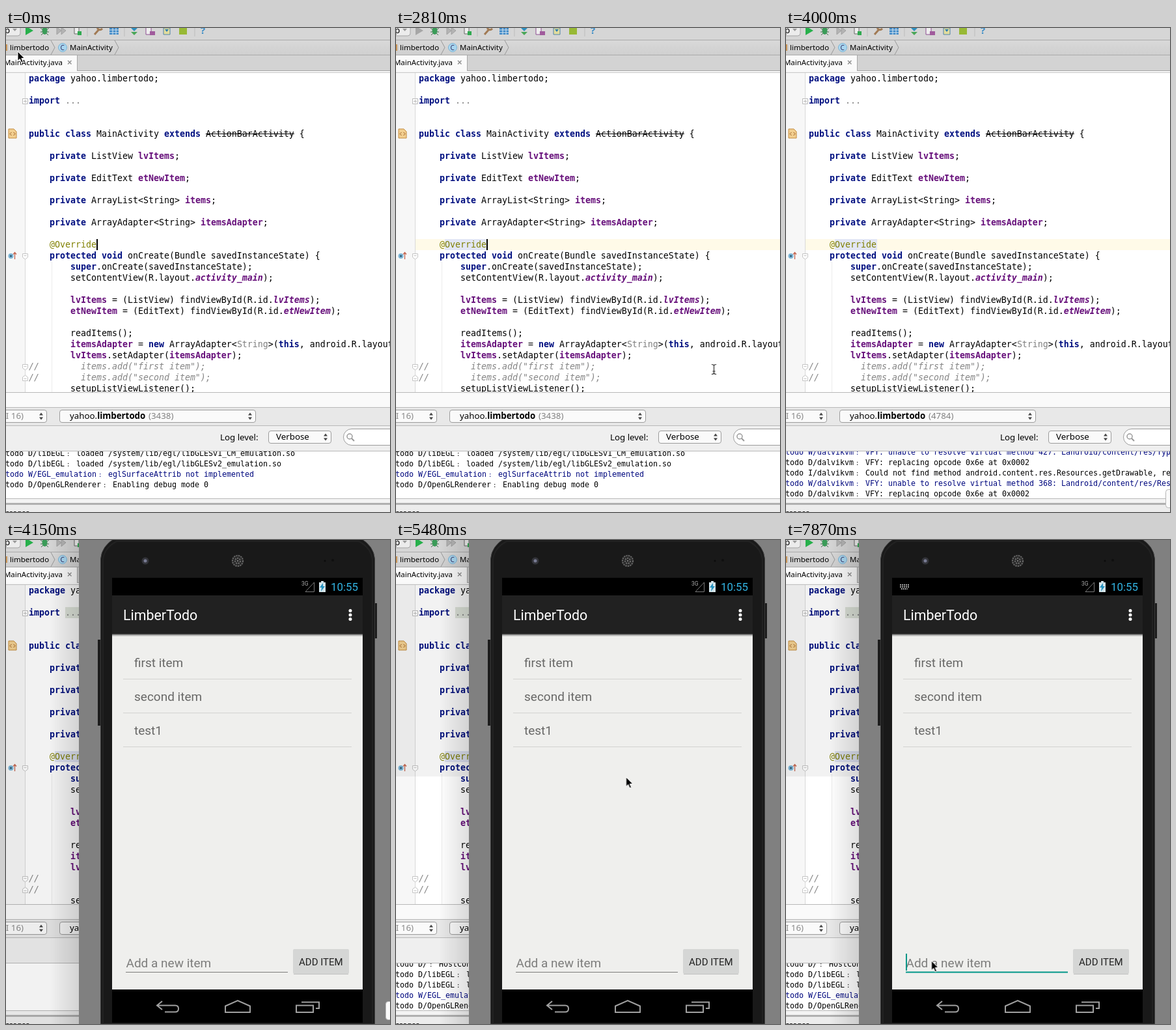
An HTML page for the animation above (8 s loop, 590 by 743 pixels).

```html
<!DOCTYPE html>
<html lang="en">
<head>
<meta charset="utf-8">
<title>Editor and emulator</title>
<style>
html, body { margin: 0; width: 100%; height: 100%; overflow: hidden; }
#stage { position: relative; width: 590px; height: 743px; overflow: hidden; background: #ececec; }
#stage > * { position: absolute; left: 0; top: 0; }
svg { display: block; font: 13.3px "Noto Sans", sans-serif; }
.small { font-size: 11.5px; }
.app { font-family: Roboto, sans-serif; font-size: 19px; }

#stage > .code { left: 35px; top: 69px; width: 555px; height: 490px; margin: 0; overflow: hidden;
  font: 13.29px/17px "DejaVu Sans Mono", monospace; color: #000; }
.code b { color: #000f80; }
.code em { color: #660e7a; font-weight: bold; font-style: normal; }
.code em.static { font-style: italic; }
.code i { color: #858585; }
.code q { color: #808080; }
.code u { color: #808000; text-decoration: none; }
q::before, q::after { content: none; }

#stage > .log { top: 650px; width: 590px; height: 71px; overflow: hidden;
  font: 11.63px/15px "DejaVu Sans Mono", monospace; white-space: pre; color: #000; }
.log p { margin: 0 0 0 -1px; }
.log div { position: absolute; top: -6px; left: 0; }
.log div.old { top: -4px; }
.log q { display: inline-block; width: 18px; font-size: 9px; text-indent: 3px; }
.log .warn { color: #00087f; }

/* every change is a hard cut inside one 8 s loop */
.old, .fresh, .late, .line, .word, .import, .idle, .busy, .caret, .tip, .phone, .dim,
.focus, .blur, .arrow, .beam { animation: 8s step-end infinite; }
.old { animation-name: old; }
.fresh { animation-name: fresh; }
.late { animation-name: late; }
.line { animation-name: line; }
.word { animation-name: word; }
.import { animation-name: import; }
.idle { animation-name: idle; }
.busy { animation-name: busy; }
.caret { animation-name: caret; }
.tip { animation-name: tip; }
.phone { animation-name: phone; }
.dim { animation-name: dim; }
.focus { animation-name: focus; }
.blur { animation-name: blur; }
.arrow { animation-name: arrow; }
.beam { animation-name: beam; }
@keyframes old { 0% { opacity: 1 } 44.375%, 100% { opacity: 0 } }
@keyframes fresh { 0% { opacity: 0 } 44.375% { opacity: 1 } 51.875%, 100% { opacity: 0 } }
@keyframes late { 0% { opacity: 0 } 64.75%, 100% { opacity: 1 } }
@keyframes line { 0% { opacity: 0 } 14.75% { opacity: 1 } 51.875%, 100% { opacity: 0 } }
@keyframes word { 0% { opacity: 0 } 14.75%, 100% { opacity: 1 } }
@keyframes import { 0% { fill: #fff } 14.75% { fill: #fdf4dc } 22% { fill: #fff } 51.875%, 100% { fill: #e2e8de } }
@keyframes idle { 0% { opacity: 1 } 20.25% { opacity: 0 } 46.25%, 100% { opacity: 1 } }
@keyframes busy { 0% { opacity: 0 } 20.25% { opacity: 1 } 46.25%, 100% { opacity: 0 } }
@keyframes caret {
  0% { opacity: 1 } 7.375% { opacity: 0 } 12.875% { opacity: 1 } 20.25% { opacity: 0 }
  25.75% { opacity: 1 } 31.375% { opacity: 0 } 35.125% { opacity: 1 } 40.75% { opacity: 0 }
  46.25% { opacity: 1 } 50%, 100% { opacity: 0 }
}
@keyframes tip { 0% { opacity: 0 } 48.125% { opacity: 1 } 57.375%, 100% { opacity: 0 } }
@keyframes phone { 0% { opacity: 0 } 51.875%, 100% { opacity: 1 } }
@keyframes dim { 0% { opacity: 0 } 51.875% { opacity: 1 } 64.75%, 100% { opacity: 0 } }
@keyframes focus { 0% { opacity: 0 } 94.75%, 100% { opacity: 1 } }
@keyframes blur { 0% { opacity: 1 } 94.75%, 100% { opacity: 0 } }
@keyframes arrow {
  0% { transform: translate(18px, 36px) }
  1.75% { transform: translate(16px, 31px) }
  3.625% { transform: translate(18px, 22px) }
  5.5% { transform: translate(27px, 11px) }
  7.375% { transform: translate(35px, 4px) }
  9.25% { transform: translate(39px, 2px) }
  22% { transform: translate(70px, 40px) }
  23.875% { transform: translate(-50px, 0) }
  40.75% { transform: translate(535px, 640px) }
  42.5% { transform: translate(560px, 715px) }
  44.375% { transform: translate(-50px, 0) }
  66.625% { transform: translate(376px, 478px) }
  68.5% { transform: translate(353.5px, 364px) }
  72.25% { transform: translate(346px, 395px) }
  74.125% { transform: translate(334px, 420px) }
  77.875% { transform: translate(350px, 400px) }
  79.75% { transform: translate(374px, 368px) }
  83.5% { transform: translate(270px, 559px) }
  87.25% { transform: translate(248px, 605px) }
  89.125% { transform: translate(230px, 636px) }
  92.875%, 100% { transform: translate(223.5px, 646px) }
}
@keyframes beam {
  0% { transform: translate(-50px, 0) }
  23.875% { transform: translate(150px, 150px) }
  25.75% { transform: translate(270px, 304px) }
  27.625% { transform: translate(320px, 370px) }
  29.5% { transform: translate(365px, 420px) }
  31.375% { transform: translate(408px, 464px) }
  35.125% { transform: translate(488.5px, 524px) }
  38.875% { transform: translate(510px, 555px) }
  40.75%, 100% { transform: translate(-50px, 0) }
}
</style>
</head>
<body>
<div id="stage">

<svg width="590" height="743">
  <defs>
    <linearGradient id="bar" x2="0" y2="1"><stop stop-color="#d9d9d9"/><stop offset="1" stop-color="#cfcfcf"/></linearGradient>
    <linearGradient id="shade"><stop stop-opacity="0"/><stop offset="1" stop-opacity=".13"/></linearGradient>
    <path id="updown" d="M-3-1.5L0-5.5 3-1.5ZM-3 1.5L0 5.5 3 1.5Z" fill="#444"/>
    <path id="play" d="M30-3L42 4 30 11Z"/>
    <path id="fold" d="M-4-4H4V1.500L0 4.500-4 1.500ZM-2-1H2" fill="#fff" stroke="#c4c4c4"/>
  </defs>

  <!-- toolbar -->
  <rect width="590" height="18" fill="#d6d6d6"/>
  <rect x="-8" y="-8" width="30" height="20" rx="4" fill="#ececec" stroke="#a5a5a5"/>
  <text x="-2" y="8">p</text>
  <path d="M10 1h7l-3.500 4Z" fill="#999"/>
  <use href="#play" class="idle" fill="#27b04b"/>
  <use href="#play" class="busy" fill="#a6a6a6"/>
  <path d="M53 0l4 3M66 0l-4 3M53 6h13M54 11l4-4M65 11l-4-4" stroke="#476b4c"/>
  <ellipse cx="59.500" cy="4" rx="4" ry="6" fill="#3b9b58"/>
  <path d="M78-1l7 5-7 6ZM85-1l7 5-7 6Z" fill="#b4b4b4" stroke="#a0a0a0"/>
  <path d="M105-1h7V9h-7Z" fill="#eee" stroke="#666"/>
  <path d="M110 5h6v6h-6Z" fill="#31a951"/>
  <path d="M125 0V13M182 0V13M290 0V13" stroke="#bbb"/>
  <path d="M136 10l7-8M140 0q4 5 8 1" fill="none" stroke="#a27b55" stroke-width="3"/>
  <path d="M159 0h14v10h-14Z" fill="#3f88c5"/>
  <path d="M159 3h14M159 7h14M164 0V10M169 0V10" stroke="#d8e7f3"/>
  <path d="M192 0h10l-5 5Z" fill="#2b8fc0"/>
  <path d="M192 6h10l-5 5Z" fill="#4aa657"/>
  <path d="M215-1h8V10h-8Z" fill="#eee" stroke="#8d4d91"/>
  <path d="M221 5h8v6h-8Z" fill="#a05b9c"/>
  <path d="M242 0h10v10h-10Z" fill="#e2dc9d" stroke="#4f83a8"/>
  <path d="M244 2h6l-3 4Z" fill="#2f7eb3"/>
  <rect x="266" y="-1" width="12" height="11" fill="#98b935"/>
  <text x="299" y="9" font-size="15" font-weight="bold" fill="#378bc6">?</text>

  <!-- breadcrumbs and tab -->
  <rect y="18" width="590" height="24" fill="url(#bar)"/>
  <path d="M0 18.500H590M0 41.500H590" stroke="#aaa"/>
  <path d="M69 19L75 30 69 41M167 19L173 30 167 41" fill="none" stroke="#989898"/>
  <rect y="25" width="2" height="10" fill="#c99456"/>
  <g class="small">
    <text x="6" y="34">limbertodo</text>
    <circle cx="87" cy="30" r="6.500" fill="#a8d5ef" stroke="#7eb4d4"/>
    <text x="83.500" y="34" font-size="10" fill="#336">C</text>
    <text x="98" y="34">MainActivity</text>
    <rect y="42" width="590" height="25" fill="#d3d3d3"/>
    <path d="M0 42H109V67H0Z" fill="#fafafa"/>
    <path d="M109.500 42V66M109 65.500H590" stroke="#a6a6a6"/>
    <rect y="66" width="590" height="2" fill="#f6f6f6"/>
    <text x="87" y="57" text-anchor="end">MainActivity.java</text>
  </g>
  <path d="M95 50l5.500 5.500M100.500 50l-5.500 5.500" stroke="#888" stroke-width="1.300"/>

  <!-- editor -->
  <path d="M0 68H590V559H0Z" fill="#fff"/>
  <path d="M0 68H29V559H0Z" fill="#f7f7f7"/>
  <path d="M29.500 68V559" stroke="#d9d9d9"/>
  <path d="M0 68.500H590" stroke="#c9c9c9"/>
  <path d="M70.500 359V559" stroke="#ececec"/>
  <rect class="line" x="30" y="324" width="560" height="17" fill="#fffae8"/>
  <rect class="word" x="75" y="324" width="65" height="17" fill="#e2e6f5"/>
  <rect class="import" x="91" y="103" width="24" height="17"/>
  <path d="M4 155h8l4 4v10H4Z" fill="#f2cf91" stroke="#c28a3c"/>
  <path d="M8.500 160l-2.500 2.500 2.500 2.500M11.500 160l2.500 2.500-2.500 2.500" fill="none" stroke="#9c5a1e"/>
  <circle cx="7.500" cy="350" r="4" fill="#7db6d6"/><circle cx="7.500" cy="350" r="1.500" fill="#28526b"/>
  <path d="M13.500 355V345M11 347.500l2.500-3 2.500 3" fill="none" stroke="#c3654f" stroke-width="1.300"/>
  <path d="M25.500 108.500h8v8h-8ZM27 112.500h5M29.500 110v5" fill="#fff" stroke="#bbb"/>
  <use href="#fold" x="29.500" y="350.500"/>
  <use href="#fold" x="29.500" y="520.500"/>
  <use href="#fold" transform="translate(29.500 537.500) scale(1 -1)"/>

  <!-- tool window -->
  <path d="M0 560H590V583H0Z" fill="#fafafa"/>
  <path d="M0 583H590V610H0Z" fill="#e8e8e8"/>
  <path d="M0 611H590V650H0Z" fill="#efefef"/>
  <path d="M0 650H590V731H0Z" fill="#fff"/>
  <path d="M0 722H590V729H0Z" fill="#f3f3f3"/>
  <path d="M0 559.500H590M0 582.500H590M0 610.500H590M0 649.500H590M0 722.500H590" stroke="#b9b9b9"/>
  <path d="M0 730.500H590" stroke="#b0b0b0" stroke-width="3"/>
  <g fill="#fafafa" stroke="#9c9c9c">
    <rect x="-10" y="586.500" width="72.500" height="19" rx="3.500"/>
    <rect x="82.500" y="586.500" width="301" height="19" rx="3.500"/>
    <rect x="403.500" y="618.500" width="96" height="19" rx="3.500"/>
    <rect x="518.500" y="615.500" width="100" height="25" rx="12.500" fill="#fff"/>
  </g>
  <use href="#updown" x="54" y="596"/><use href="#updown" x="375" y="596"/><use href="#updown" x="491" y="628"/>
  <circle cx="528" cy="627" r="4" fill="none" stroke="#999" stroke-width="1.500"/>
  <path d="M531 630l4 4" stroke="#999" stroke-width="2"/>
  <text x="27" y="600" text-anchor="end" fill="#888">API 16)</text>
  <text x="98" y="600">yahoo.<tspan font-weight="bold">limbertodo</tspan></text>
  <text class="old" x="219" y="600" fill="#808080">(3438)</text>
  <g class="word"><text class="late" x="219" y="600" fill="#808080">(4784)</text></g>
  <text class="fresh" x="219" y="600" fill="#808080">(4784)</text>
  <text x="329" y="633">Log level:</text>
  <text x="415" y="632">Verbose</text>
  <text class="small" x="36" y="748" text-anchor="end">Messages</text>
</svg>

<pre class="code"><b>package</b> yahoo.limbertodo;

<b>import</b> <q>...</q>


<b>public class</b> MainActivity <b>extends</b> <s>ActionBarActivity</s> {

    <b>private</b> ListView <em>lvItems</em>;

    <b>private</b> EditText <em>etNewItem</em>;

    <b>private</b> ArrayList&lt;String&gt; <em>items</em>;

    <b>private</b> ArrayAdapter&lt;String&gt; <em>itemsAdapter</em>;

    <u>@Override</u>
    <b>protected void</b> onCreate(Bundle savedInstanceState) {
        <b>super</b>.onCreate(savedInstanceState);
        setContentView(R.layout.<em class="static">activity_main</em>);

        <em>lvItems</em> = (ListView) findViewById(R.id.<em class="static">lvItems</em>);
        <em>etNewItem</em> = (EditText) findViewById(R.id.<em class="static">etNewItem</em>);

        readItems();
        <em>itemsAdapter</em> = <b>new</b> ArrayAdapter&lt;<q>String</q>&gt;(<b>this</b>, android.R.layout.simple_list_item_1, items);
        <em>lvItems</em>.setAdapter(<em>itemsAdapter</em>);
<i>//        items.add("first item");</i>
<i>//        items.add("second item");</i>
        setupListViewListener();</pre>

<div class="log">
  <div class="old"><p>todo D/libEGL<q>:</q>loaded /system/lib/egl/libGLESv1_CM_emulation.so</p><p>todo D/libEGL<q>:</q>loaded /system/lib/egl/libGLESv2_emulation.so</p><p class="warn">todo W/EGL_emulation<q>:</q>eglSurfaceAttrib not implemented</p><p>todo D/OpenGLRenderer<q>:</q>Enabling debug mode 0</p></div>
  <div class="fresh"><p class="warn">todo W/dalvikvm<q>:</q>VFY: unable to resolve virtual method 427: Landroid/content/res/TypedArray;</p><p>todo D/dalvikvm<q>:</q>VFY: replacing opcode 0x6e at 0x0002</p><p>todo I/dalvikvm<q>:</q>Could not find method android.content.res.Resources.getDrawable, referenced</p><p class="warn">todo W/dalvikvm<q>:</q>VFY: unable to resolve virtual method 368: Landroid/content/res/Resources;</p><p>todo D/dalvikvm<q>:</q>VFY: replacing opcode 0x6e at 0x0002</p></div>
  <div class="late"><p>todo D/<q>:</q>HostConnection::get()</p><p>todo D/libEGL<q>:</q>loaded /system</p><p>todo D/libEGL<q>:</q>loaded /system</p><p class="warn">todo W/EGL_emulation<q>:</q></p><p>todo D/OpenGLRenderer<q>:</q></p></div>
</div>

<svg width="590" height="743">
  <rect class="caret" x="139" y="324" width="2" height="17"/>

  <g class="phone">
    <rect y="68" width="112" height="295" opacity=".05"/>
    <rect class="dim" y="363" width="112" height="380" fill-opacity=".05"/>
    <rect x="66" width="46" height="743" fill="url(#shade)"/>
    <rect x="112" width="478" height="743" fill="#808080"/>

    <!-- body -->
    <path d="M141 153h6V285h-6ZM565 97h5V151h-5Z" fill="#1c1c1c"/>
    <path d="M145.500 743V29Q147 9 168-3H544Q565 9 566.500 29V743Z" fill="#191919" stroke="#3a3a3a"/>
    <path d="M149 743V30Q151 12 170 2H542Q561 12 563 30V743" fill="none" stroke="#222" stroke-width="2"/>
    <circle cx="214" cy="32" r="5.500" fill="#33343a"/><circle cx="214" cy="32" r="2.500" fill="#777a92"/>
    <circle cx="356" cy="32" r="9.500" fill="#292929"/>
    <circle cx="356" cy="32" r="8" fill="none" stroke="#6a6a6a" stroke-width="2" stroke-dasharray="2 1.500"/>
    <circle cx="356" cy="32" r="4" fill="none" stroke="#707070" stroke-width="2" stroke-dasharray="2 1.500"/>
    <circle cx="356" cy="32" r="1.200" fill="#777"/>
    <circle cx="490" cy="32" r="1.500" fill="#0b0b0b"/><circle cx="502" cy="31" r="2" fill="#101010"/>

    <!-- screen -->
    <path d="M163 58H548V741H163Z"/>
    <path d="M163 85H548V145H163Z" fill="#212121"/>
    <path d="M163 145H548V690H163Z" fill="#efefed"/>
    <path d="M163 145.500H548" stroke="#8c8c8b" stroke-width="2"/>
    <path d="M163 147.500H548" stroke="#d3d3d1"/>
    <path d="M180 213.500H531M180 265.500H531M180 317.500H531" stroke="#d3d3d1"/>
    <g class="app">
      <text x="454" y="70" font-size="8.500" fill="#aaa">3G</text>
      <path d="M460 79.500H473.500V65Z" fill="none" stroke="#777"/>
      <path d="M481 65h3v-2h4v2h3v15h-10Z" fill="#d4e4ea"/>
      <path d="M487 66l-5 7h3l-1 6 6-8h-3Z" fill="#2594c2"/>
      <text x="499" y="78" font-size="16.900" fill="#33b5e5">10:55</text>
      <text x="180" y="123" font-size="21.400" fill="#fff">LimberTodo</text>
      <g fill="#fff"><circle cx="529" cy="108.500" r="2.500"/><circle cx="529" cy="115" r="2.500"/><circle cx="529" cy="121.500" r="2.500"/></g>
      <g fill="#686867">
        <text x="197" y="195">first item</text>
        <text x="197" y="247">second item</text>
        <text x="197" y="299">test1</text>
      </g>
      <text x="184.500" y="656" fill="#7c7c7b">Add a new item</text>
      <rect x="441" y="628" width="86" height="38" rx="2" fill="#d5d6d5"/>
      <path d="M442 666.500H526" stroke="#c2c2c1"/>
      <text x="450" y="653" font-size="15" fill="#222">ADD ITEM</text>
    </g>
    <path class="blur" d="M184 663.500H433" stroke="#7c7c7b"/>
    <g class="focus">
      <path d="M184 663.500H433M185 635V661" stroke="#009688" stroke-width="2"/>
      <path d="M175 69h14M175 72h14M177 75h10" stroke="#aaa" stroke-width="2" stroke-dasharray="2 1"/>
    </g>
    <g fill="none" stroke="#a0a0a0" stroke-width="2">
      <path d="M240 708L232 714.500 240 721M232 714.500H260Q265 714.500 265 719.500T260 724.500H244"/>
      <path d="M337 725V715.500L356 707 375 715.500V725Z"/>
      <path d="M446 714.500H472V725H446ZM454 709.500H481V719H476"/>
    </g>
  </g>

  <rect class="tip" x="583.500" y="708.500" width="20" height="28" rx="4" fill="#fafafa" stroke="#b5b5b5"/>
  <path class="beam" d="M-3.500-7.500Q0-7.500 0-5V5Q0 7.500-3.500 7.500M3.500-7.500Q0-7.500 0-5V5Q0 7.500 3.500 7.500M-2 3H2" fill="none" stroke="#222" stroke-width="1.200"/>
  <path class="arrow" d="M0 0V14.500L3.300 11.400 5.700 17 8.200 16 5.800 10.500H10.300Z" stroke="#fff"/>
</svg>

</div>
</body>
</html>
```
